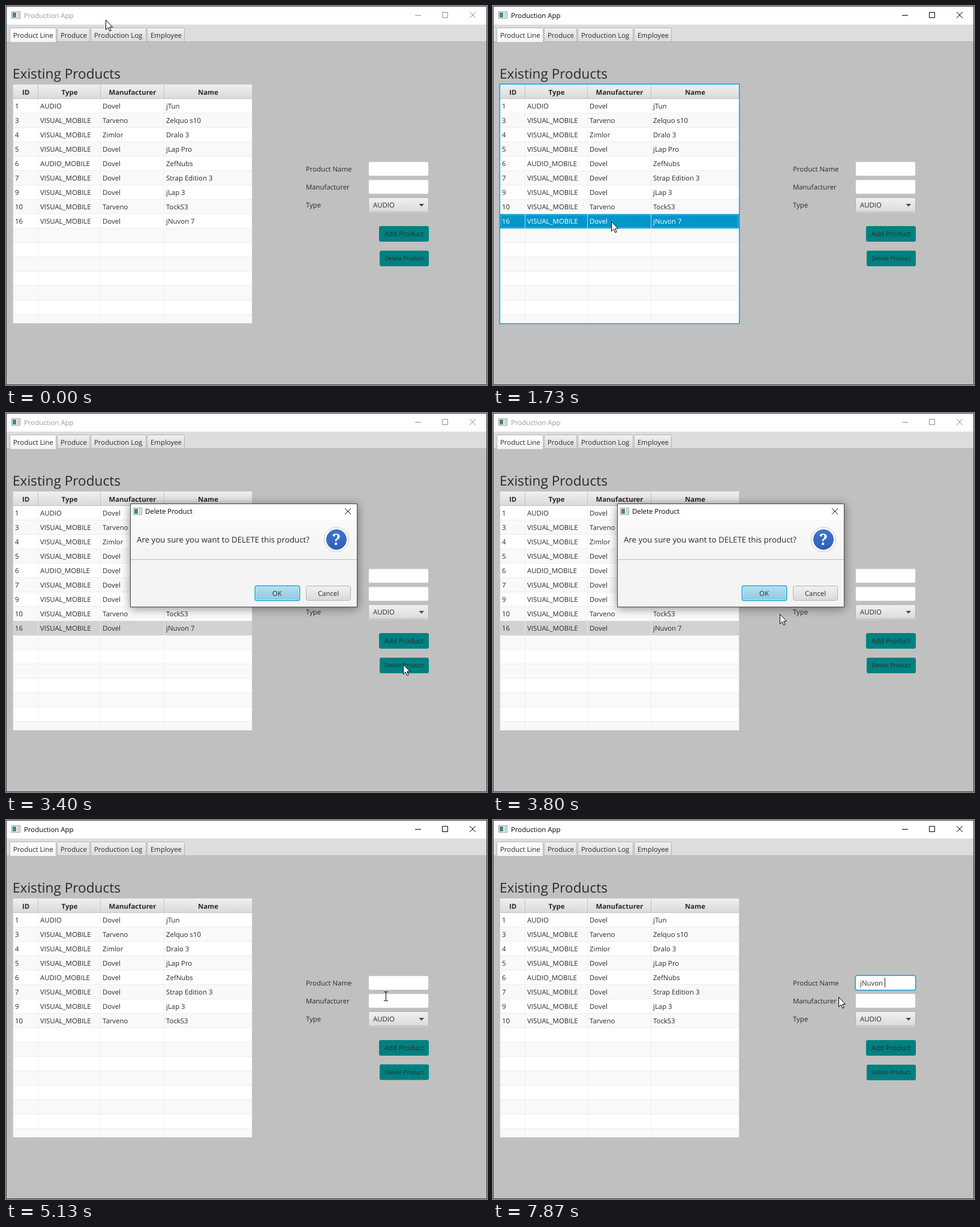
An HTML page for the animation above (8 s loop, 802 by 632 pixels).

```html
<!DOCTYPE html>
<html lang="en">
<head>
<meta charset="utf-8">
<title>Production App</title>
<style>
html, body { margin: 0; width: 100%; height: 100%; overflow: hidden; background: #c0c0c0; }
svg { display: block; }
text { font: 11.4px "Open Sans", "Noto Sans", sans-serif; fill: #2a2a2a; white-space: pre; text-rendering: geometricPrecision; }
.bold { font-weight: 700; }
.mid { text-anchor: middle; }
.shadow { filter: drop-shadow(0 2px 8px rgba(0, 0, 0, .45)); }
</style>
</head>
<body>
<svg id="stage" width="802" height="632" viewBox="0 0 802 632"></svg>
<script>
const LOOP = 8000, RATE = 0.015; // screen refreshes per ms
const SELECT = 1730, PRESS = 3200, ASK = 3270, CONFIRM = 4530, CLOSE = 4670, FOCUS = 5330;
const OK_HOVER = 4000;
const columns = [[12, "ID", 33], [54, "Type", 106], [158, "Manufacturer", 211], [264, "Name", 337]];
const products = [
  "1|AUDIO|Dovel|jTun",
  "3|VISUAL_MOBILE|Tarveno|Zelquo s10",
  "4|VISUAL_MOBILE|Zimlor|Dralo 3",
  "5|VISUAL_MOBILE|Dovel|jLap Pro",
  "6|AUDIO_MOBILE|Dovel|ZefNubs",
  "7|VISUAL_MOBILE|Dovel|Strap Edition 3",
  "9|VISUAL_MOBILE|Dovel|jLap 3",
  "10|VISUAL_MOBILE|Tarveno|TockS3",
  "16|VISUAL_MOBILE|Dovel|jNuvon 7"
].map(line => line.split("|"));
const typed = "jNuvon ", keyTimes = [6400, 6730, 7000, 7200, 7330, 7470, 7870];

// Pointer path: time, x, y
const path = [
  [0, 166, 23], [133, 166, 23], [330, 148, 42], [530, 225, 130], [730, 390, 240], [870, 485, 295],
  [1000, 484, 322], [1070, 455, 343], [1130, 418, 353], [1330, 280, 358], [1600, 197, 359],
  [2000, 197, 359], [2200, 260, 376], [2530, 500, 424], [2730, 642, 437], [2870, 682, 436],
  [2930, 688, 433], [3070, 691, 431], [3330, 690, 430], [3530, 610, 398], [3730, 506, 357],
  [3800, 478, 335], [4000, 462, 306], [4270, 460, 297], [4870, 460, 297], [5000, 530, 297],
  [5130, 633, 294], [5270, 660, 278], [5470, 679, 264], [5600, 679, 264], [5800, 628, 280],
  [6000, 576, 295], [LOOP, 576, 295]
];

const rect = (x, y, w, h, fill, extra = "") =>
  `<rect x="${x}" y="${y}" width="${w}" height="${h}" fill="${fill}" ${extra}/>`;
const frame = (x, y, w, h, fill, stroke, r = 0) =>
  rect(x + .5, y + .5, w - 1, h - 1, fill, `stroke="${stroke}" rx="${r}"`);
const line = (d, stroke, extra = "") => `<path d="${d}" fill="none" stroke="${stroke}" ${extra}/>`;
const text = (x, y, s, attrs = "") => `<text x="${x}" y="${y}" ${attrs}>${s}</text>`;
const group = (id, content) => `<g id="${id}">${content}</g>`;
const gradient = (id, top, bottom) => `<linearGradient id="${id}" x2="0" y2="1">
  <stop stop-color="${top}"/><stop offset="1" stop-color="${bottom}"/></linearGradient>`;
const icon = (x, y) => frame(x, y, 15, 12, "#f4f6f6", "#929b9d") +
  rect(x + 2, y + 2, 6, 8, "url(#tealIcon)") + rect(x + 10, y + 2, 3, 8, "#c5cacb");
const cross = (x, y) => `M${x} ${y}l10 10m0-10l-10 10`;

// A blue ring on the edge of a box, with a faint halo around it
const focusRing = (x, y, w, h, r) =>
  line(`M${x - .8} ${y - .8}h${w + 1.6}v${h + 1.6}h${-w - 1.6}z`, "#039ed3", 'stroke-width="1.2" opacity=".15" stroke-linejoin="round"') +
  rect(x + .4, y + .4, w - .8, h - .8, "none", `stroke="#039ed3" stroke-width="1.2" rx="${r}"`);
// A raised control with a light line under its lower edge
const button = (x, y, w, h) =>
  rect(x, y + 1, w, h, "#fff", 'rx="3" opacity=".4"') + frame(x, y, w, h, "url(#grey)", "#b0b0b0", 3);

function titleBar() {
  return rect(1, 1, 800, 30, "#fff") + icon(9, 9) + text(30, 20, "Production App", 'id="title"') +
    line(`M682 15.5h10M727.5 10.5h9v9h-9z${cross(773, 10)}`, "currentColor", 'id="controls"');
}

function tabs() {
  const rest = [[85, 55, "Produce"], [141, 93, "Production Log"], [235, 63, "Employee"]];
  return rect(1, 31, 800, 29, "#dcdddd") + rect(1, 59, 800, 1, "#b3b5b5") +
    rest.map(([x, w, s]) => frame(x, 36, w, 24, "url(#grey)", "#b3b4b4", 2) + text(x + 6, 53, s)).join("") +
    frame(6, 36, 78, 26, "url(#tab)", "#b3b4b4", 2) + rect(6, 60, 78, 3, "#c0c0c0") +
    text(12, 53, "Product Line");
}

function productRow(cells, i) {
  return cells.map((s, c) => text(columns[c][0] + 3, 171 + i * 24, s)).join("");
}

function table() {
  let out = rect(11, 130, 400, 400, "#fff");
  for (let i = 0; i < 16; i++) {
    const y = 155 + i * 24, h = Math.min(24, 529 - y);
    out += rect(12, y, 398, h, i % 2 ? "#f9f9f9" : "#fff");
    if (h === 24) out += rect(12, y + 23, 398, 1, "#ededed");
  }
  out += group("marked", rect(12, 347, 398, 24, "currentColor") +
    line("M13.5 348.5h395v21h-395z", "#45b6dc", 'id="markEdge"'));
  out += rect(12, 131, 398, 24, "url(#head)") + rect(12, 154, 398, 1, "#c4c4c4");
  for (const x of [53, 157, 263]) out += rect(x, 131, 1, 24, "#c4c4c4") + rect(x, 155, 1, 374, "#ededed", 'opacity=".75"');
  out += columns.map(([, s, x]) => text(x, 148, s, 'class="bold mid"')).join("");
  out += products.slice(0, -1).map(productRow).join("") + group("lastRow", productRow(products[8], 8));
  return out + frame(11, 130, 400, 400, "none", "#c8c8c8") +
    group("tableRing", focusRing(11, 130, 400, 400, 0));
}

function field(y) {
  return frame(604, y, 101, 25, "#fff", "#c6c6c6", 3) + rect(606, y + 1, 97, 1, "#f1f1f1");
}

function form() {
  return text(500, 276, "Product Name") + text(500, 306, "Manufacturer") + text(500, 336, "Type") +
    field(259) + field(289) + button(604, 319, 101, 25) +
    text(612, 336, "AUDIO") + `<path d="M688.5 330h8.500l-4.200 4.500z" fill="#444"/>` +
    rect(622, 367, 83, 26, "#008080", 'rx="3"') + text(663.5, 384, "Add Product", 'class="mid"') +
    rect(623, 408, 82, 26, "#008080", 'rx="3" id="remove"') +
    text(664, 424, "Delete Product", 'class="mid" style="font-size:9.4px"') +
    group("entry", rect(604, 259, 101, 25, "#fff", 'rx="3"') + focusRing(604, 259, 101, 25, 3) +
      text(612, 276, "", 'id="typed"') + rect(0, 263, 1, 16, "#222", 'id="caret"'));
}

function dialog() {
  return group("dialog", rect(207, 151, 379, 173, "#454545", 'class="shadow"') +
    frame(207, 151, 379, 173, "#f4f4f4", "#454545") +
    rect(208, 152, 377, 26, "#fff") + icon(212, 158) +
    text(232, 168, "Delete Product", 'style="fill:#000"') + line(cross(565, 159), "#111") +
    rect(208, 178, 377, 66, "url(#panel)") + rect(208, 244, 377, 1, "#b9b9b9") +
    text(218, 216, "Are you sure you want to DELETE this product?", 'style="font-size:13.3px"') +
    `<circle cx="551" cy="211" r="20.500" fill="#fff" stroke="#c8c8c8"/><circle cx="551" cy="211" r="17" fill="url(#blue)"/>` +
    text(551, 220, "?", 'class="mid" style="font:700 26px \'Noto Serif\',serif;fill:#fff"') +
    rect(415, 288, 75, 25, "#cdebf6", 'rx="3"') + rect(417, 290, 71, 21, "url(#ok)", 'id="ok" rx="1.500"') +
    focusRing(415, 288, 75, 25, 3) + text(452, 305, "OK", 'class="mid"') +
    button(500, 288, 75, 25) + text(537.5, 305, "Cancel", 'class="mid"'));
}

const defs = `<defs>${gradient("grey", "#f1f1f1", "#dadada")}${gradient("head", "#f0f0f0", "#d9d9d9")}
  ${gradient("tab", "#fff", "#f3f3f3")}${gradient("panel", "#fafafa", "#f4f4f4")}
  ${gradient("blue", "#3f75cc", "#2f5fb8")}${gradient("tealIcon", "#4b7c8c", "#38937b")}
  ${gradient("ok", "#b1def0", "#91cae1")}${gradient("okHover", "#c0e7f5", "#a3d7eb")}
  ${gradient("okDown", "#8fc8df", "#7ab9d3")}</defs>`;
const pointer = group("arrow", `<path d="M.5.5v16.200l3.700-3.600 2.700 5.700 2.300-1-2.600-5.600h5z" fill="#fff" stroke="#000"/>`) +
  group("beam", line("M-3 -7.500h2.500q1 0 1 1v13q0 1-1 1h-2.500M4 -7.500h-2.500q-1 0-1 1v13q0 1 1 1h2.500", "#000"));

const stage = document.getElementById("stage");
stage.innerHTML = defs + rect(0, 0, 802, 632, "#c0c0c0") + titleBar() + tabs() +
  text(11, 121, "Existing Products", 'style="font-size:22.6px"') + table() + form() +
  frame(0, 0, 802, 632, "none", "#3c3c3c") + dialog() + pointer;
const el = {};
stage.querySelectorAll("[id]").forEach(node => el[node.id] = node);
// The gradient shares its name with the button it fills
el.ok = stage.querySelector("rect#ok");
const show = (node, on) => node.style.display = on ? "" : "none";

function pointerAt(t) {
  const i = Math.max(1, path.findIndex(p => p[0] >= t));
  const [t0, x0, y0] = path[i - 1], [t1, x1, y1] = path[i];
  const k = (t - t0) / (t1 - t0);
  return [Math.round(x0 + (x1 - x0) * k), Math.round(y0 + (y1 - y0) * k)];
}

function draw(t) {
  const asking = t >= ASK && t < CLOSE;
  const active = t >= SELECT && !asking;
  const tableFocus = t >= SELECT && t < PRESS;

  el.title.style.fill = active ? "#000" : "#999";
  el.controls.style.color = active ? "#000" : "#8e8e8e";
  show(el.marked, t >= SELECT && t < CLOSE);
  el.marked.style.color = tableFocus ? "#0096c9" : "#d0d3d2";
  show(el.markEdge, tableFocus);
  show(el.tableRing, tableFocus);
  show(el.lastRow, t < CLOSE);
  for (const cell of el.lastRow.children) cell.style.fill = tableFocus ? "#fff" : "";

  show(el.dialog, asking);
  el.ok.setAttribute("fill", `url(#${t >= CONFIRM ? "okDown" : t >= OK_HOVER ? "okHover" : "ok"})`);
  el.remove.setAttribute("y", t >= CLOSE && t < FOCUS ? 407.5 : 408);

  show(el.entry, t >= FOCUS);
  el.typed.textContent = typed.slice(0, keyTimes.filter(k => t >= k).length);
  show(el.caret, t < FOCUS + 530 || t >= keyTimes[0]);
  if (t >= FOCUS) el.caret.setAttribute("x", Math.floor(612 + el.typed.getComputedTextLength()));

  const [x, y] = pointerAt(t);
  const overField = t >= CLOSE && x >= 604 && x < 705 && (y >= 259 && y < 284 || y >= 289 && y < 314);
  show(el.arrow, !overField);
  show(el.beam, overField);
  (overField ? el.beam : el.arrow).setAttribute("transform", `translate(${x} ${y})`);
}

function loop(now) {
  const t = now % LOOP;
  // Snap to the refresh steps, rounded to 10 ms like the times above
  draw(Math.round(Math.floor((t + 4) * RATE) / RATE / 10) * 10 % LOOP);
  requestAnimationFrame(loop);
}
requestAnimationFrame(loop);
</script>
</body>
</html>
```
